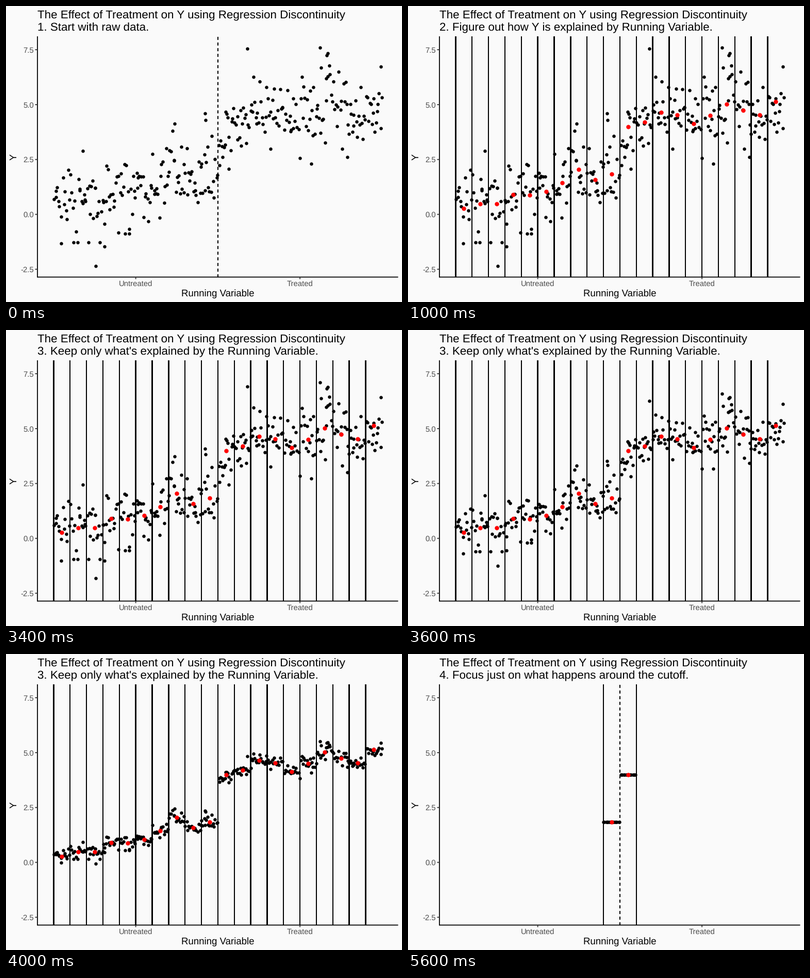
Animation, 768 px wide and 576 px high, one loop 8 s. Source, as a matplotlib script:

```python
import numpy as np
import matplotlib.pyplot as plt
from matplotlib.animation import FuncAnimation
from matplotlib.patches import Rectangle

plt.rcParams["font.family"] = "Liberation Sans"
plt.rcParams["text.hinting"] = "none"
W, H, DPI = 768, 576, 96
PX = 72 / DPI
TOP, BOTTOM, LEFT, RIGHT = 59, 527.5, 61, 760.5
X0, STEP, BINS, PER_BIN = 92.38, 31.85, 20, 15

TITLE = "The Effect of Treatment on Y using Regression Discontinuity"
STEPS = [
    "1. Start with raw data.",
    "2. Figure out how Y is explained by Running Variable.",
    "3. Keep only what's explained by the Running Variable.",
    "4. Focus just on what happens around the cutoff.",
]

# Mean of Y in each bin, left to right
MEANS = np.array([0.28, 0.475, 0.48, 0.91, 0.88, 1.04, 1.445, 2.055, 1.59, 1.83,
                  3.99, 4.2, 4.65, 4.54, 4.12, 4.51, 5.02, 4.735, 4.53, 5.145])

# Extreme points: horizontal position and Y
EXTREMES = [(174, -2.35), (149, 2.9), (191, -1.46), (327, 4.13), (386, 4.61),
            (387, 4.3), (432, 2.08), (468, 7.56), (592, 2.31), (608.5, 7.6),
            (623.5, 7.33), (622, 7.25), (662, 2.6), (726.5, 6.73)]


def to_px(value):
    return 405.5 - 42.72 * value


def make_points():
    """Evenly jittered points with normal noise, plus the extremes."""
    rng = np.random.default_rng(12)
    n = BINS * PER_BIN
    x = X0 + STEP / PER_BIN * (np.arange(n) + rng.random(n))
    y = np.repeat(MEANS, PER_BIN) + np.clip(rng.normal(0, 0.85, n), -1.75, 1.75)
    ex, ey = np.transpose(EXTREMES)
    return np.append(x, ex), np.append(y, ey)


xs, ys = make_points()
bins = ((xs - X0) // STEP).astype(int)
goal = MEANS[bins]
near = (bins == 9) | (bins == 10)

fig = plt.figure(figsize=(W / DPI, H / DPI), dpi=DPI, facecolor="#FAFAFA")
ax = fig.add_axes([0, 0, 1, 1])
ax.set(xlim=(0, W), ylim=(H, 0))
ax.axis("off")


def label(x, y, text, size, color="black", **kw):
    return ax.text(x, y, text, fontsize=size, color=color, va="baseline", **kw)


def line(x, y, color="black", width=1.8, **kw):
    return ax.plot(x, y, color=color, lw=width * PX, solid_capstyle="butt",
                   snap=False, **kw)[0]


def bar(k):
    """A bin edge that fills whole pixels."""
    x = X0 + k * STEP
    a, b = np.ceil(x - 1.7), np.floor(x + 0.7) + 1
    return ax.add_patch(Rectangle((a, TOP), b - a, BOTTOM - TOP, fc="black",
                                  lw=0, antialiased=False, zorder=2))


def markers(x, y, size, color, zorder):
    return ax.scatter(x, y, s=(size * PX) ** 2, c=color, lw=0,
                      antialiased=False, zorder=zorder)


label(61, 24.5, TITLE, 16.8)
subtitle = label(61, 48.5, "", 16.8)
label(410.5, 565, "Running Variable", 14, ha="center")
label(20.5, 293.5, "Y", 14, ha="center", rotation=90, rotation_mode="anchor")

line([LEFT, LEFT], [TOP, BOTTOM + 0.9])
line([LEFT, RIGHT], [BOTTOM, BOTTOM])
for value in np.arange(-2.5, 8, 2.5):
    y = to_px(value)
    line([LEFT - 4.5, LEFT], [y, y], "#333333")
    label(54, y + 5.5, f"{value:.1f}", 11.2, "#4D4D4D", ha="right")
for bin_edge, name in ((5, "Untreated"), (15, "Treated")):
    x = X0 + bin_edge * STEP
    line([x, x], [BOTTOM, BOTTOM + 4], "#333333")
    label(x, 545.7, name, 11.2, "#4D4D4D", ha="center")

cutoff = line([411, 411], [BOTTOM, TOP], width=2, linestyle=(0, (2.845, 2.845)),
              antialiased=False, zorder=2)
edges = [bar(k) for k in range(BINS)]
dots = markers(xs, to_px(ys), 6.5, "black", 1)
centers = np.column_stack([X0 + STEP * (np.arange(BINS) + 0.5), to_px(MEANS)])
means = markers(*centers.T, 8.4, "red", 3)


def update(i):
    focus, binned = i >= 56, i >= 10
    subtitle.set_text(STEPS[(i >= 5) + (i >= 31) + focus])

    u = np.clip((i - 30) / 14, 0, 1)
    p = (1 - np.cos(np.pi * u)) / 2
    points = np.column_stack([xs, to_px(ys + (goal - ys) * p)])
    dots.set_offsets(points[near] if focus else points)

    means.set_visible(binned)
    means.set_offsets(centers[9:11] if focus else centers)
    cutoff.set_visible(focus or not binned)
    for k, edge in enumerate(edges):
        edge.set_visible(k in (9, 11) if focus else binned)
    return subtitle, dots, means, cutoff, *edges


anim = FuncAnimation(fig, update, frames=80, interval=100, repeat=True, repeat_delay=0)
plt.show()
```
